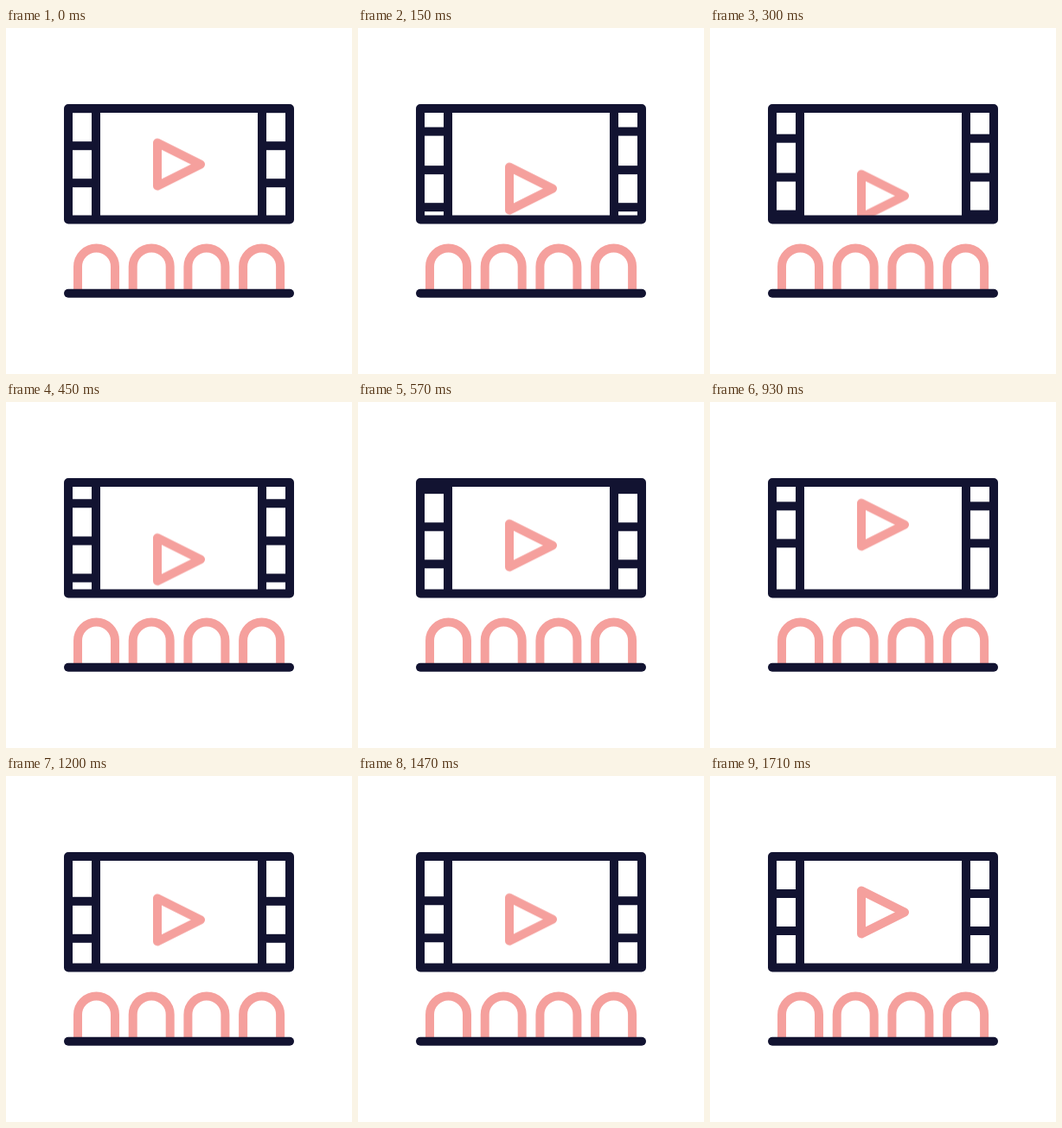
An HTML page that plays this animation: 400x400 px, repeating every 1.83 s.

```html
<!DOCTYPE html>
<html lang="en">
<head>
<meta charset="utf-8">
<title>Cinema screen</title>
<style>
  html, body { margin: 0; width: 100%; height: 100%; overflow: hidden; background: #fff; }
  svg { display: block; width: 100%; height: 100%; fill: none; stroke-width: 10; stroke-linejoin: round; }
  .dark { stroke: #121331; }
  .pink { stroke: #f5a09d; }
  .swing { animation: swing 1830ms infinite; }
  .extra { animation: extra 1830ms infinite; }

  /* Damped bounce that rests from 1710 ms until the loop ends */
  @keyframes swing {
    0% { transform: translateY(0); animation-timing-function: cubic-bezier(.3, .4, .6, 1); }
    14.754% { transform: translateY(37px); animation-timing-function: cubic-bezier(.333, 0, .667, 1); }
    46.721% { transform: translateY(-18px); animation-timing-function: cubic-bezier(.333, 0, .667, 1); }
    71.311% { transform: translateY(13px); animation-timing-function: cubic-bezier(.333, 0, .667, 1); }
    93.443%, 100% { transform: translateY(0); }
  }

  /* Bar that drops out of the top edge during the first swing only */
  @keyframes extra {
    0% { transform: translateY(0); animation-timing-function: cubic-bezier(.3, .4, .6, 1); }
    14.754% { transform: translateY(35px); animation-timing-function: cubic-bezier(.45, 0, .7, .75); }
    35.3%, 100% { transform: translateY(0); }
  }
</style>
</head>
<body>
<svg viewBox="0 0 400 400">
  <defs>
    <path id="seat" d="M83 304V276a21.5 21.5 0 0 1 43 0V304"/>
    <path id="bars" d="M72 0H104M296 0H328"/>
    <clipPath id="screen"><rect x="67" y="88" width="266" height="138.5" rx="5"/></clipPath>
  </defs>

  <g class="pink">
    <use href="#seat"/>
    <use href="#seat" x="63.7"/>
    <use href="#seat" x="127.4"/>
    <use href="#seat" x="191.1"/>
  </g>
  <path class="dark" stroke-linecap="round" d="M72 306.8H328"/>

  <g clip-path="url(#screen)">
    <path class="pink swing" d="M175 132.5V182.5L225 157.5Z"/>
    <g class="dark swing">
      <use href="#bars" y="136"/>
      <use href="#bars" y="179"/>
    </g>
    <g class="dark extra"><use href="#bars" y="93"/></g>
  </g>
  <path class="dark" d="M72 93H328V221.5H72ZM104 93V221.5M296 93V221.5"/>
</svg>
</body>
</html>
```
